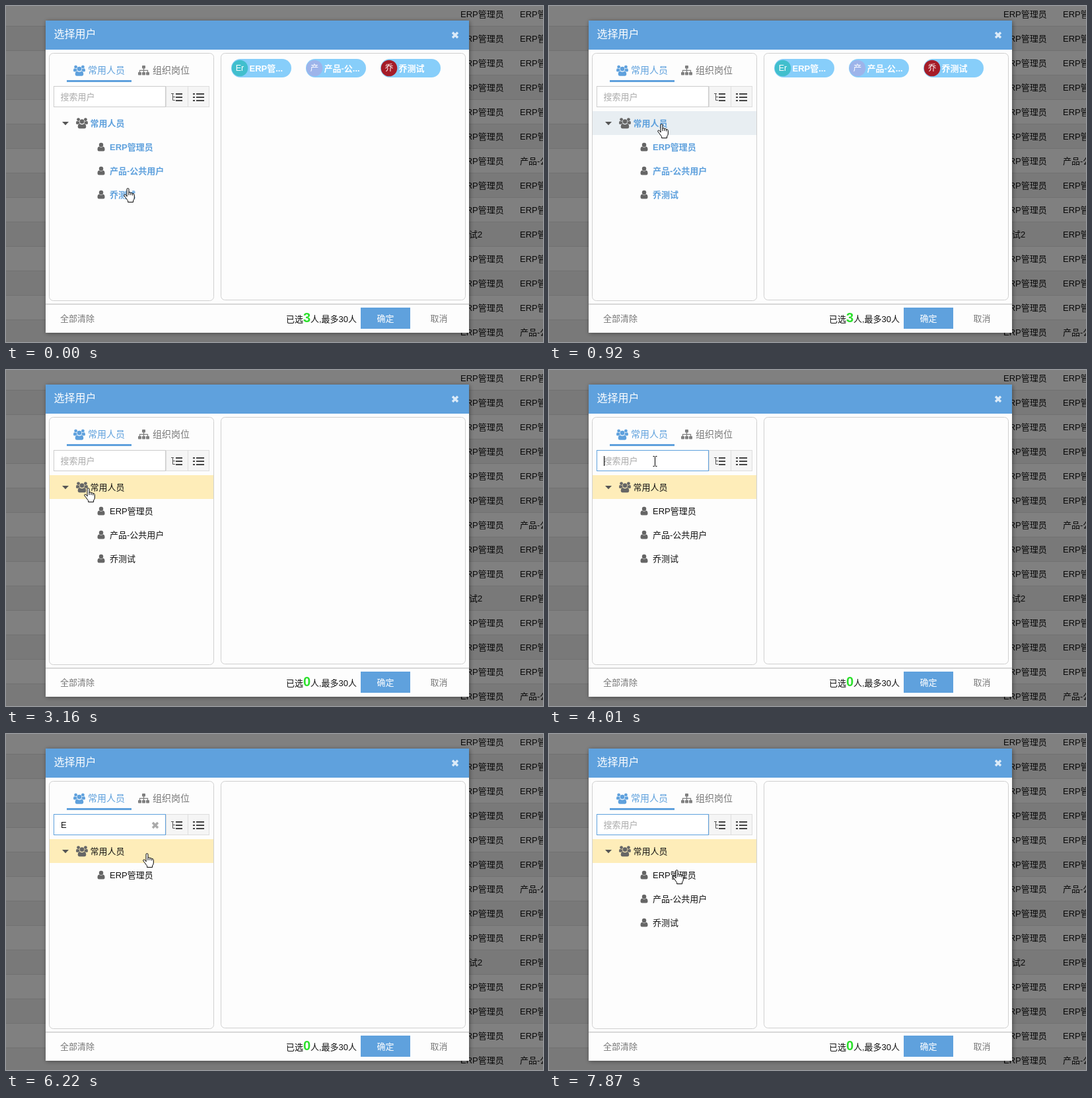
Animation, 813 px wide and 508 px high, one loop 7990 ms. Source, as an HTML page:

```html
<!DOCTYPE html>
<html lang="zh-CN">
<head>
<meta charset="utf-8">
<title>选择用户</title>
<style>
html, body { margin: 0; width: 100%; height: 100%; overflow: hidden; background: #808080; }
svg { display: block; width: 813px; height: 508px; }
text { font-family: "Liberation Sans", "Noto Sans CJK SC", "Noto Sans CJK", sans-serif; white-space: pre; }
</style>
</head>
<body>
<svg id="stage" viewBox="0 0 813 508" xmlns="http://www.w3.org/2000/svg">
  <defs>
    <filter id="blur" x="-10%" y="-10%" width="120%" height="120%"><feGaussianBlur stdDeviation="3"/></filter>
    <g id="user" transform="translate(.5 .6) scale(.92)">
      <circle cx="6" cy="3.6" r="3.5"/>
      <path d="M0 11.2C0 8 1 6.6 2.8 6.3Q6 9 9.2 6.3C11 6.6 12 8 12 11.2Q12 14 9.7 14H2.3Q0 14 0 11.2Z"/>
    </g>
    <g id="users">
      <circle cx="3.6" cy="2.6" r="2.4"/>
      <circle cx="14.4" cy="2.6" r="2.4"/>
      <path d="M0 8.2Q0 5 1.4 4.8Q3.3 6 5 5.2Q4.9 7.4 6 8.5Q4.3 8.5 3.4 9.8H1.6Q0 9.8 0 8.2Z"/>
      <path d="M18 8.2Q18 5 16.6 4.8Q14.7 6 13 5.2Q13.1 7.4 12 8.5Q13.7 8.5 14.6 9.8H16.4Q18 9.8 18 8.2Z"/>
      <circle cx="9" cy="5.6" r="3.4"/>
      <path d="M2.7 13.8C2.7 10.5 3.8 9.1 5.8 9Q9 11.4 12.2 9C14.2 9.1 15.3 10.5 15.3 13.8Q15.3 16.2 13 16.2H5Q2.7 16.2 2.7 13.8Z"/>
    </g>
    <path id="cross" d="M2 2L10 10M10 2L2 10" fill="none" stroke-width="3.4"/>
    <g id="hand" stroke="#000" stroke-linejoin="round">
      <path fill="#fff" d="M5 13V2.2Q5 .6 6.5 .6T8 2.2V7.6Q8.2 6.5 9.6 6.7T11 8Q11.4 7.3 12.5 7.5T13.8 9Q14.2 8.4 15.2 8.8T16.3 10.4V15Q16.3 17.5 14.6 19V21.6H6.6V19.4Q4.5 17 3.2 14.8L.8 11.8Q.4 10.3 1.6 10Q3 9.8 5 12.4Z"/>
      <path fill="none" d="M8 7.5V11M11 8V11M13.8 9V11.5"/>
    </g>
    <path id="beam" d="M.5 .5H2.5L3.5 1.5L4.5 .5H6.5M3.5 1.5V14.5M.5 15.5H2.5L3.5 14.5L4.5 15.5H6.5" fill="none" stroke="#000"/>
  </defs>
</svg>
<script>
const LOOP = 7990;
const BLUE = "#5fa1dd";
const stage = document.getElementById("stage");

function add(tag, attrs, parent = stage) {
  const el = document.createElementNS("http://www.w3.org/2000/svg", tag);
  for (const key in attrs) el.setAttribute(key, attrs[key]);
  parent.appendChild(el);
  return el;
}
const group = () => add("g", {});
const rect = (x, y, width, height, fill, more = {}, parent = stage) =>
  add("rect", { x, y, width, height, fill, ...more }, parent);
const box = (x, y, w, h, fill, stroke, rx = 0) =>
  rect(x + .5, y + .5, w - 1, h - 1, fill, { stroke, rx });
const path = (d, more, parent) => add("path", { d, ...more }, parent);
const use = (id, x, y, more = {}, parent = stage) =>
  add("use", { href: "#" + id, x, y, ...more }, parent);
function label(str, x, y, size, fill, more = {}, parent = stage) {
  const el = add("text", { x, y, "font-size": size, fill, ...more }, parent);
  el.textContent = str;
  return el;
}
const show = (el, on) => el.setAttribute("visibility", on ? "visible" : "hidden");

const ADMIN = "ERP管理员", SHARED = "产品-公共用户", TESTER = "乔测试";

// Dimmed table behind the dialog
for (let i = 0; i < 14; i++) {
  const top = i * 37 - 7;
  rect(0, top, 813, 37, i % 2 ? "#797979" : "#808080");
  rect(0, top, 813, 1, "#717171");
  label(i === 9 ? "测试2" : ADMIN, 688, top + 24, 13, "#080808");
  label(i === 6 || i === 13 ? SHARED : ADMIN, 778, top + 24, 13, "#080808");
}

// Dialog frame
rect(61, 23, 641, 472, "#000", { opacity: .4, filter: "url(#blur)" });
rect(60, 22, 641, 472, "#fdfdfd");
rect(60, 22, 641, 44, BLUE);
label("选择用户", 72.5, 48, 16, "#fff");
use("cross", 674, 38, { stroke: "#dcebf8" });
box(65, 71, 250, 375, "none", "#d0d0d0", 6);
box(325, 71, 371, 374, "none", "#d0d0d0", 6);

// Tabs
use("users", 102, 89.5, { fill: BLUE });
label("常用人员", 124, 102, 14, BLUE);
rect(92, 112, 98, 3, BLUE);
const org = add("g", { transform: "translate(200 90)", fill: "#808080" });
for (const [x, y] of [[6, 0], [0, 10], [6, 10], [12, 10]]) rect(x, y, 5, 4.6, "#808080", { rx: .8 }, org);
path("M8.5 4V11M2.5 11V7.4H14.5V11", { fill: "none", stroke: "#808080", "stroke-width": 1.3 }, org);
label("组织岗位", 222, 102, 14, "#777");

// Search row
box(242, 121, 34, 32, "#f5f5f5", "#ddd");
box(275, 121, 33, 32, "#f5f5f5", "#ddd");
const field = box(72, 121, 170, 32, "#fff", "#ccc");
for (const y of [132, 137, 142]) {
  rect(257, y, 10, 2, "#444");
  rect(288, y, 12, 2, "#444");
  rect(283, y, 3, 2, "#444");
}
path("M250 132.5H254M252.5 132.5V142.5H256M252.5 137.5H256", { fill: "none", stroke: "#555" });
const hint = label("搜索用户", 82.5, 141.5, 13, "#aaa");
const typed = label("E", 83, 142, 13, "#111");
const clear = use("cross", 220, 132);
const caret = rect(83, 130, 1, 15, "#000");

// User tree
const rowBack = rect(66, 159, 248, 36, "none");
path("M85 175H95L90 180.2Z", { fill: "#555" });
use("users", 106, 169, { fill: "#666" });
const names = [label("常用人员", 127.5, 182, 13, "#000")];
const rows = [ADMIN, SHARED, TESTER].map((name, i) => {
  const row = group(), y = 213 + i * 36;
  use("user", 138, y - 7, { fill: "#666" }, row);
  names.push(label(name, 157, y + 5, 13, "#000", {}, row));
  return row;
});

// Selected users
const chips = group();
[["Er", "ERP管...", "#41bfcd"], ["产", "产品-公...", "#9db4ea"], ["乔", TESTER, "#a51c28"]]
  .forEach(([mark, name, color], i) => {
    const x = 341 + i * 113;
    rect(x, 80, 91, 28, "#87cefa", { rx: 14 }, chips);
    add("circle", { cx: x + 13, cy: 94, r: 12.3, fill: color }, chips);
    label(mark, x + 13, 98.3, 12.5, "#fff", { "text-anchor": "middle" }, chips);
    label(name, x + 27.5, 98.5, 13, "#fff", { "font-weight": 700 }, chips);
  });

// Footer
rect(60, 450, 641, 1.5, "#ccc");
label("全部清除", 82, 477, 13, "#777");
label("已选", 424, 477.5, 13, "#111");
const count = label("3", 450, 478, 20, "#2be02b", { "font-weight": 700 });
label("人,最多30人", 461, 477.5, 13, "#111");
rect(537, 456, 75, 32, BLUE);
label("确定", 574.5, 477, 13, "#fff", { "text-anchor": "middle" });
label("取消", 655.5, 477, 13, "#777", { "text-anchor": "middle" });

// Pointer: time, shape, left, top
const pointer = use("hand", 0, 0);
const moves = [
  [0, "hand", 178, 275], [530, "hand", 177, 272], [680, "hand", 174, 250],
  [800, "hand", 169, 212], [920, "hand", 164, 178],
  [3040, "hand", 138, 178], [3160, "hand", 118, 178], [3310, "hand", 124, 164],
  [3430, "beam", 142, 140], [3580, "beam", 157, 130], [4570, ""],
  [5280, "beam", 190, 130], [5550, "hand", 185, 186], [5700, "hand", 192, 204],
  [5820, "hand", 198, 212], [5940, "hand", 201, 194], [6090, "hand", 204, 188],
  [6210, "hand", 207, 180], [6340, "hand", 208, 172], [6490, "hand", 208, 163],
  [6640, "hand", 215, 149], [6790, "hand", 219, 141], [6920, "hand", 221, 137],
  [7200, "beam", 227, 130], [7600, "hand", 206, 172], [7720, "hand", 193, 195],
  [7870, "hand", 187, 205]
];

function draw(t) {
  const within = (from, to) => t >= from && t < to;
  const [, shape, x, y] = moves.findLast(m => m[0] <= t);
  show(pointer, shape);
  if (shape) {
    pointer.setAttribute("href", "#" + shape);
    pointer.setAttribute("x", x);
    pointer.setAttribute("y", y);
  }

  rowBack.setAttribute("fill", t < 920 ? "none" : t < 2390 ? "#e8eef2" : "#feedb9");
  show(chips, t < 2390);
  const chosen = t < 2520;
  count.textContent = chosen ? "3" : "0";
  for (const name of names) {
    name.setAttribute("fill", chosen ? BLUE : "#111");
    name.setAttribute("font-weight", chosen ? 700 : 400);
  }

  const filled = within(4570, 7200);
  field.setAttribute("stroke", t < 4010 ? "#ccc" : BLUE);
  show(hint, !filled);
  show(typed, filled);
  show(clear, filled);
  clear.setAttribute("stroke", t < 6790 ? "#aaa" : "#555");
  show(caret, within(4010, 5150) || within(5700, 6090) || within(6640, 7600));
  caret.setAttribute("x", filled ? 92 : 83);
  for (const row of rows.slice(1)) show(row, !within(5150, 7600));
}

function tick(now) {
  draw(now % LOOP);
  requestAnimationFrame(tick);
}
draw(0);
requestAnimationFrame(tick);
</script>
</body>
</html>
```
